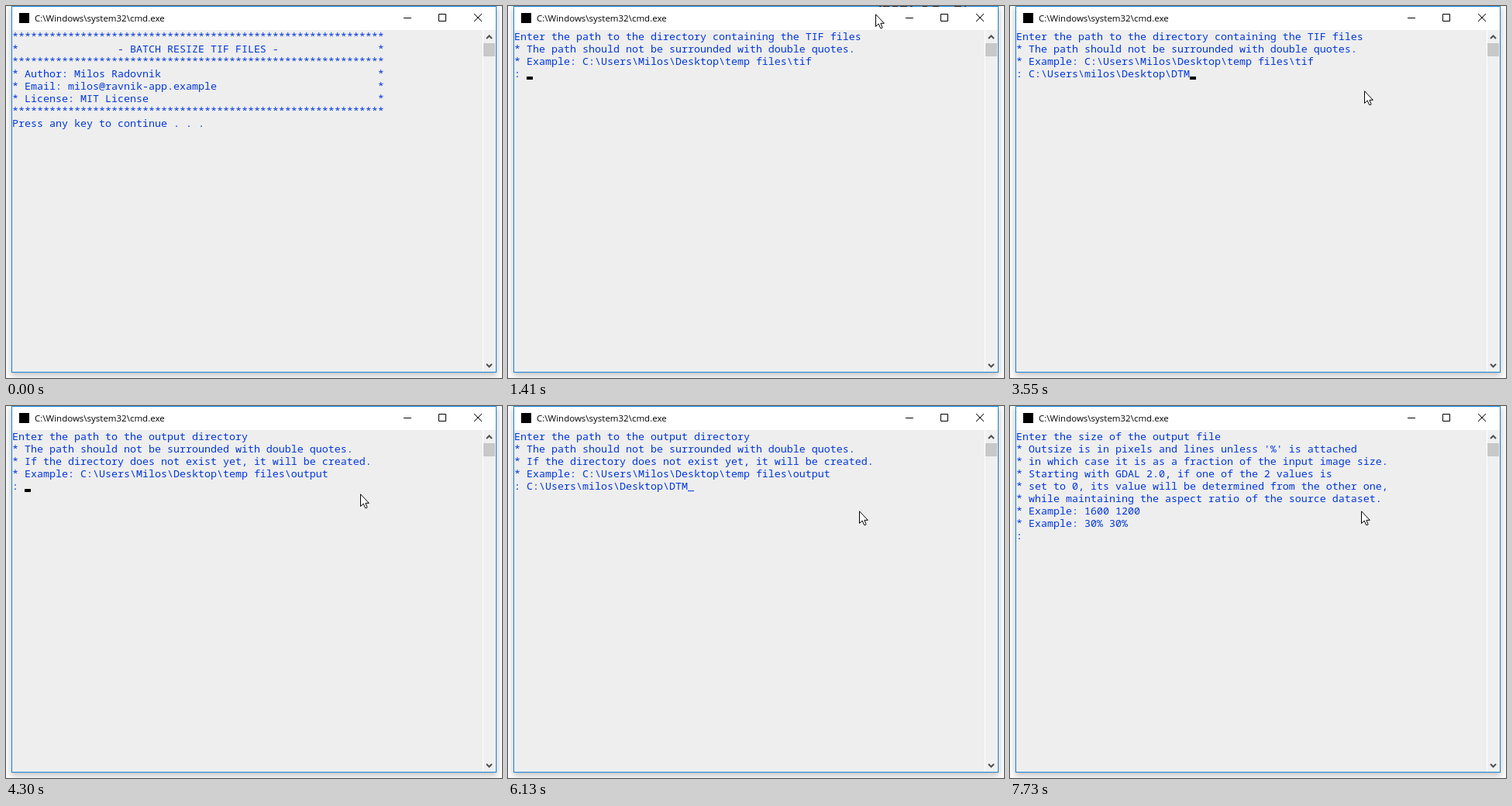
Recreate the animation shown at these times as an HTML page. Size 640x480 px, loop 8 s.

```html
<!DOCTYPE html>
<html lang="en">
<head>
<meta charset="utf-8">
<title>Batch resize</title>
<style>
html, body { margin: 0; width: 100%; height: 100%; overflow: hidden; background: #fbfbfb; }
#window {
  position: absolute; left: 7px; top: 0; width: 624px; height: 471px;
  border: 1px solid #1883d7; background: #eee; box-shadow: 0 3px 7px rgba(0, 0, 0, .25);
}
svg { position: absolute; left: 0; top: 0; }
svg text { font: 11.5px "Open Sans", "Noto Sans", sans-serif; }
#screen {
  position: absolute; left: 8px; top: 31px; margin: 0; color: #0037da;
  font: 13.3333px/16px "Noto Sans Mono", "Liberation Mono", monospace;
  font-variant-ligatures: none;
}
#caret { position: absolute; width: 8px; height: 4px; background: #000; }
</style>
</head>
<body>
<div id="window"></div>
<svg width="640" height="480" fill="none">
  <path fill="#fff" d="M8 1H632V31H8Z"/>
  <path id="bits" stroke="#111" d="M479 .5h3m2 0h8m4 0h7m3 0h9m4 0h3m13 0h6m7 0h8m20 0h9m4 0h2"/>
  <path fill="#000" d="M17 9h13v13h-13Z"/>
  <text x="37" y="20" fill="#000">C:\Windows\system32\cmd.exe</text>
  <path stroke="#000" d="M513 15.5h10M558.5 10.5h9v9h-9ZM604 10l10 10m0-10l-10 10"/>
  <path fill="#f0f0f0" d="M616 31h16v441h-16Z"/>
  <path stroke="#fff" d="M615.5 31v441"/>
  <path fill="#c8c8c8" d="M616 48h15v17h-15Z"/>
  <path stroke="#505050" stroke-width="2" d="M620 42l3.5-3.5 3.5 3.5M620 462l3.5 3.5 3.5-3.5"/>
</svg>
<pre id="screen"></pre>
<div id="caret"></div>
<svg width="640" height="480">
  <path id="mouse" fill="#fff" stroke="#000" d="M.5 .8V16.5L4.2 13 6.6 18.5H8.6L9 17.6 6.9 12.3H11.4Z"/>
</svg>
<script>
const $ = id => document.getElementById(id);
const stars = '*'.repeat(60);
const boxed = s => s.padEnd(59) + '*';
const lines = (...rows) => rows.join('\n');
const home = 'C:\\Users\\Milos\\Desktop\\';
const path = home.replace('Milos', 'milos') + 'DTM';
const quotes = '* The path should not be surrounded with double quotes.';

const banner = lines(stars, boxed('*'.padEnd(17) + '- BATCH RESIZE TIF FILES -'), stars,
  boxed('* Author: Milos Radovnik'), boxed('* Email: milos@ravnik-app.example'),
  boxed('* License: MIT License'), stars, 'Press any key to continue . . . ');
const inputHead = lines('Enter the path to the directory containing the TIF files', quotes,
  `* Example: ${home}temp files\\tif`, '');
const outputHead = lines('Enter the path to the output directory', quotes,
  '* If the directory does not exist yet, it will be created.',
  `* Example: ${home}temp files\\output`, '');
const input = inputHead + ': ', output = outputHead + ': ';
const size = lines('Enter the size of the output file',
  "* Outsize is in pixels and lines unless '%' is attached",
  '* in which case it is as a fraction of the input image size.',
  '* Starting with GDAL 2.0, if one of the 2 values is',
  '* set to 0, its value will be determined from the other one,',
  '* while maintaining the aspect ratio of the source dataset.',
  '* Example: 1600 1200', '* Example: 30% 30%', ': ');

// [start, text, caret visible]; the caret sits after the last character
const states = [
  [0, banner, 0], [460, banner, 1], [980, banner, 0],
  [1410, input, 1], [2040, input, 0], [2540, input, 1],
  [2670, input + path, 1], [3000, input + path, 0], [3550, input + path, 1],
  [3710, inputHead + `* ${path}s\n:`, 0],
  [3770, output, 1], [4580, output, 0],
  [4710, output + path, 1], [5140, output + path, 0], [5640, output + path, 1],
  [5770, output + path + '_', 1], [6130, output + path + '_', 0],
  [6190, output + path + '_O', 1], [6350, output + path + '_OU', 1],
  [6410, output + path + '_OUT', 1], [6640, output + path + '_OUT', 0],
  [7000, outputHead + `* ${path}_OUTt\n*`, 0],
  [7100, size, 1], [7730, size, 0]
];

// [start, steps, from x, from y, to x, to y]
const moves = [
  [160, 14, 584, -18, 474, 10],
  [2200, 7, 474, 10, 443, 157],
  [3000, 6, 443, 157, 457, 109],
  [4300, 5, 457, 109, 453, 135]
];

function pointer(t) {
  const move = moves.findLast(m => m[0] <= t);
  if (!move) return [0, -40];
  const [start, steps, x0, y0, x1, y1] = move;
  const p = Math.min(1, (Math.floor((t - start) / 30) + 1) / steps);
  const e = (p + p * p * (3 - 2 * p)) / 2;
  return [Math.ceil(x0 + (x1 - x0) * e), Math.ceil(y0 + (y1 - y0) * e)];
}

let shown;
function draw(now) {
  const t = now % 8000;
  const state = states.findLast(s => s[0] <= t);
  if (state !== shown) {
    shown = state;
    const [, text, caretOn] = state;
    const rows = text.split('\n');
    $('screen').textContent = text;
    $('caret').style.left = 8 + 8 * rows.at(-1).length + 'px';
    $('caret').style.top = 27 + 16 * rows.length + 'px';
    $('caret').style.visibility = caretOn ? 'visible' : 'hidden';
  }
  $('bits').style.visibility = t >= 160 && t < 3550 ? 'visible' : 'hidden';
  $('mouse').setAttribute('transform', `translate(${pointer(t)})`);
}

const origin = performance.now();
function tick() {
  draw(performance.now() - origin);
  requestAnimationFrame(tick);
}
tick();
</script>
</body>
</html>
```
